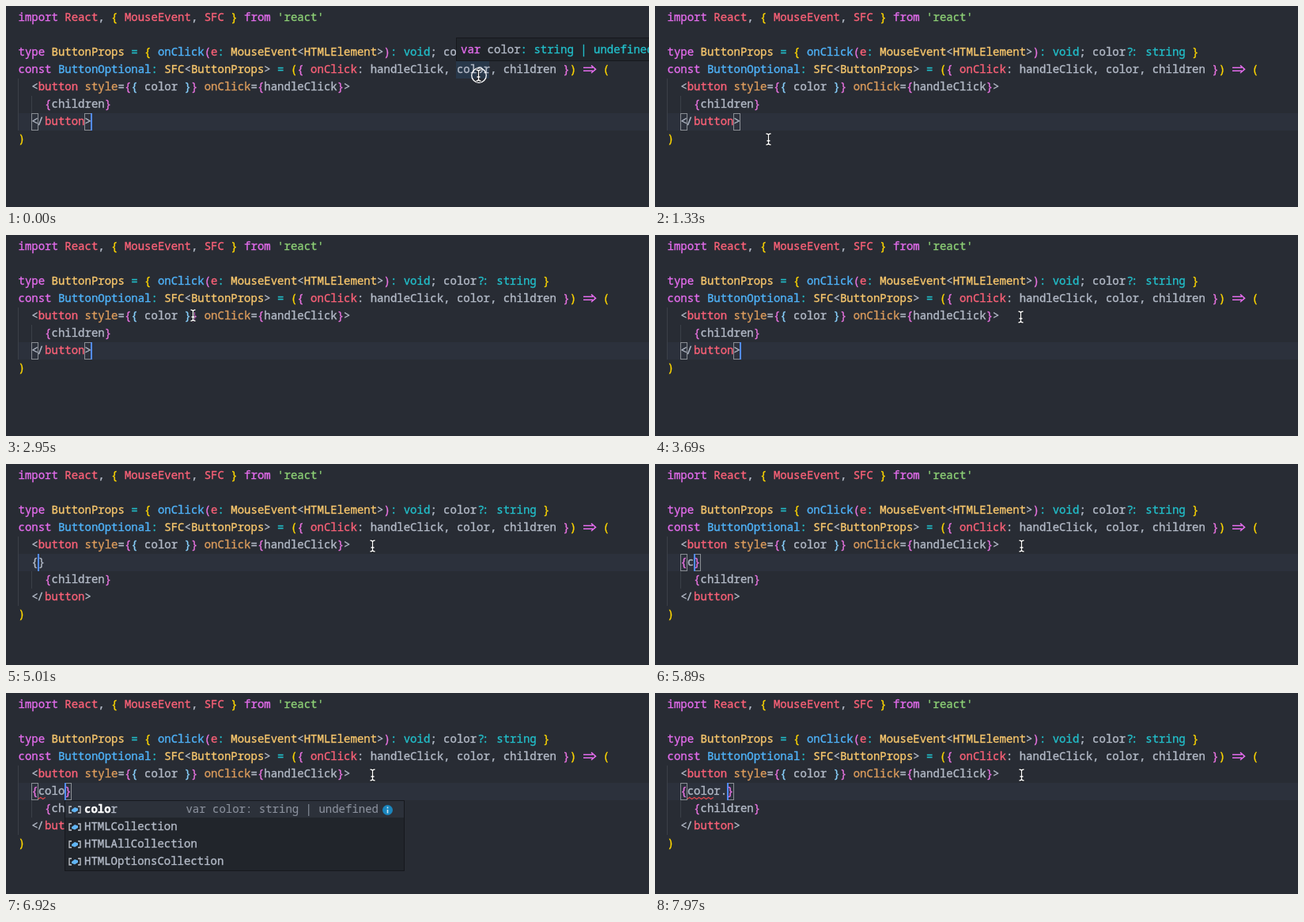
An HTML page for the animation above (8000 ms loop, 813 by 255 pixels).

```html
<!DOCTYPE html>
<html lang="en">
<head>
<meta charset="utf-8">
<title>Typing in a code editor</title>
<style>
  html, body { margin: 0; width: 100%; height: 100%; overflow: hidden; background: #282c34; }
  svg { display: block; width: 813px; height: 255px; }
  text { font: 14px "Noto Sans Mono", "DejaVu Sans Mono", monospace; white-space: pre; font-variant-ligatures: none; }
  tspan { fill: currentColor; stroke: currentColor; stroke-width: .35px; }
  .f { color: #b4bbc8 }
  .p { color: #e36cec }
  .r { color: #fa6177 }
  .y { color: #f8c76c }
  .b { color: #4fb3fa }
  .c { color: #22bfca }
  .n { color: #8ccf75 }
  .o { color: #dc9c5c }
  .g { color: #ffd700 }
  .m { color: #e873e0 }
  .s { color: #87cefa }
  .w { color: #fff; font-weight: 700 }
  .d { color: #8b919d; stroke-width: .1px }
  .guide { fill: #3b4048 }
  .match { fill: none; stroke: #8a8e94 }
  .panel { fill: #21252b; stroke: #16181d }
  .line { fill: none; stroke-width: 1.3 }
</style>
</head>
<body>
<svg id="stage" viewBox="0 0 813 255"></svg>
<script>
const LOOP = 8000, CELL = 8.4, LEFT = 15.5, ROW = 22;
const stage = document.getElementById('stage');
const colX = col => LEFT + col * CELL;
const rowTop = row => 4 + row * ROW;

// "~k" switches to colour class k; an arrow after it nudges a ligature part.
const nudges = { '›': 1.5, '‹': -1.5 };
const escapeText = s => s.replace(/&/g, '&amp;').replace(/</g, '&lt;');

function text(x, y, markup) {
  let col = 0, spans = '';
  for (const token of markup.split('~').slice(1)) {
    const nudge = nudges[token[1]] || 0;
    const body = token.slice(nudge ? 2 : 1);
    spans += `<tspan class="${token[0]}" x="${(x + col * CELL + nudge).toFixed(2)}">${escapeText(body)}</tspan>`;
    col += body.length;
  }
  return `<text y="${y}">${spans}</text>`;
}
const codeLine = (row, col, markup) => text(colX(col), rowTop(row) + 15, markup);
const rect = (cls, x, y, w, h) => `<rect class="${cls}" x="${x}" y="${y}" width="${w}" height="${h}"/>`;
const fillRect = (fill, x, y, w, h) => `<rect fill="${fill}" x="${x}" y="${y}" width="${w}" height="${h}"/>`;
const path = (d, stroke, extra = '') => `<path class="line" d="${d}" stroke="${stroke}" ${extra}/>`;
const match = (row, col) => rect('match', Math.floor(colX(col)) + .5, rowTop(row) + .5, 8, 21);

const head = [
  [0, 0, "~pimport ~rReact~f, ~g{ ~rMouseEvent~f, ~rSFC ~g} ~pfrom ~n'react'"],
  [2, 0, '~ptype ~yButtonProps ~c= ~g{ ~bonClick~m(~re~c: ~yMouseEvent~f<~yHTMLElement~f>~m)~c: void~f; color~c›?~c‹: ~cstring ~g}'],
  [3, 0, '~pconst ~bButtonOptional~c: ~ySFC~f<~yButtonProps~f> ~c= ~g(~m{ ~ronClick~f: handleClick, color, children ~m}~g)~p    ~g('],
  [4, 2, '~f<~rbutton ~ostyle~f=~m{~s{ ~fcolor ~s}~m} ~oonClick~f=~m{~fhandleClick~m}~f>']
];
const tail = [
  [5, 4, '~m{~fchildren~m}'],
  [6, 2, '~f<~f‹/~rbutton~f>'],
  [7, 0, '~g)']
];
const arrow = path('M730 78.2H742M730 82.2H742M740 75.4L745.5 80.2L740 85', '#e36cec', 'style="stroke-width:1.6"');
const code = lines => lines.map(l => codeLine(...l)).join('');

// Timelines: each entry holds until the next one.
const mouseSteps = [
  [0, 597, 88], [1190, 400, 128], [1330, 143, 169], [1470, 150, 160], [1620, 172, 134],
  [1770, 188, 114], [1910, 194, 106], [2950, 236, 102], [3090, 335, 100], [3240, 430, 102],
  [3390, 460, 104], [3690, 462, 104], [3990, 463, 104]
];
const caretSteps = [
  [0, 1], [290, 0], [740, 1], [1190, 0], [1770, 1], [2210, 0], [2800, 1], [3240, 0],
  [3690, 1], [4430, 0], [4720, 1], [5450, 0], [5890, 1]
];
const typingSteps = [
  [0, ''], [5890, 'c'], [6630, 'co'], [6770, 'col'], [6920, 'colo'], [7520, 'color'], [7670, 'color.']
];
const at = (steps, t) => steps.filter(s => s[0] <= t).pop();
const CLICK = 3990, ENTER = 4720, BRACES = 5010, MATCHED = 5160;

// Suggestions: w = snippet, v = variable, m = method.
const suggestions = {
  c: 'w caption,w code,w col,w colg,w command,v color',
  co: 'w col,w colg,w command,v color,m confirm,v console',
  col: 'w col,w colg,v color,v HTMLCollection,v HTMLTableColElement,v HTMLAllCollection',
  colo: 'v color,v HTMLCollection,v HTMLAllCollection,v HTMLOptionsCollection'
};
const icons = {
  w: path('M1.5 5L8 -1', '#c5c8ce', 'style="stroke-width:3" stroke-linecap="round"') +
     path('M12.5 -5.2A3.4 3.4 0 1 0 14.2 -1.6L10.6 -1.4L10.3 -3.4Z', '#c5c8ce', 'style="stroke-width:1.6"'),
  v: path('M4 -4H1V4H4M12 -4H15V4H12', '#c5c8ce') +
     '<path d="M4 0L8 -3L12 -1.5V1L8 3.5L4 2Z" fill="#62b5f5"/>',
  m: path('M8 -6.5L14 -3.5V3.5L8 6.5L2 3.5V-3.5ZM2 -3.5L8 -.5L14 -3.5M8 -.5V6.5', '#b887dd')
};

function popup(query, x, detailed) {
  const top = rowTop(6);
  const rows = suggestions[query].split(',').map(s => s.split(' '));
  let out = rect('panel', x + .5, top + .5, 429, rows.length * ROW + 1) +
            fillRect('#2c313a', x + 1, top + 1, 428, ROW - 1);
  if (rows.length > 5) out += fillRect('#484d57', x + 420, top + 1, 10, ROW - 1);
  rows.forEach(([kind, name], i) => {
    const y = top + i * ROW, n = name.startsWith(query) ? query.length : 0;
    out += `<g transform="translate(${x + 5} ${y + 12})">${icons[kind]}</g>` +
           text(x + 25, y + 16, (n ? '~w' + name.slice(0, n) : '') + '~f' + name.slice(n));
  });
  if (detailed) {
    const note = rows[0][0] === 'w' ? 'Emmet Abbreviation' : 'var color: string | undefined';
    out += text(x + 397 - note.length * CELL, top + 16, '~d' + note) +
           `<circle cx="${x + 408.5}" cy="${top + 12.5}" r="6.5" fill="#1a85bd"/>` +
           path(`M${x + 408.5} ${top + 8.5}v2m0 1.4v4.6`, '#cfe3ee', 'style="stroke-width:1.6"');
  }
  return out;
}

const tooltip = (x, y, chars, markup, opacity = 1) =>
  `<g opacity="${opacity}">${rect('panel', x + .5, y + .5, chars * CELL + 11, 29)}${text(x + 6, y + 20, markup)}</g>`;

function squiggle(chars) {
  let d = `M${colX(3)} 134.5`;
  for (let i = 0; i < Math.round(chars * CELL / 3); i++) d += i % 2 ? 'l3 2' : 'l3 -2';
  return path(d, '#e5484d', 'style="stroke-width:1.1"');
}

function mouse(x, y, pressed) {
  const d = `M${x - 3} ${y - 7}Q${x} ${y - 7} ${x} ${y - 5}Q${x} ${y - 7} ${x + 3} ${y - 7}` +
            `M${x} ${y - 5}V${y + 5}M${x - 3} ${y + 7}Q${x} ${y + 7} ${x} ${y + 5}Q${x} ${y + 7} ${x + 3} ${y + 7}M${x - 2} ${y + 2}h4`;
  const ring = pressed ? `<circle class="line" cx="${x + .5}" cy="${y}" r="9.3" stroke="#fff"/>` : '';
  return ring + path(d, '#15171b', 'style="stroke-width:3"') + path(d, '#fff');
}

function scene(t) {
  const entered = t >= ENTER, clicked = t >= CLICK;
  const typed = at(typingSteps, t)[1];
  const firstHover = t < 1190, secondHover = t >= 2210 && t < 2950;
  const caretRow = entered ? 5 : clicked ? 4 : 6;
  const caretCol = t >= BRACES ? 3 + typed.length : entered ? 2 : clicked ? 50 : 11;
  const caretX = Math.floor(colX(caretCol));

  let out = fillRect('#2c313c', 15, rowTop(caretRow), 798, ROW);
  if (firstHover) out += fillRect('#28384a', 569, 70, 42, ROW);
  if (secondHover) out += fillRect('#28384a', 175, 92, 42, ROW);

  const shift = entered ? ROW : 0;
  out += rect('guide', 15, 92, 1, 66 + shift) + rect('guide', 32, 114 + shift, 1, ROW);
  out += code(head) + arrow + `<g transform="translate(0 ${shift})">${code(tail)}</g>`;

  if (!clicked) out += match(6, 2) + match(6, 10);
  else if (!entered) out += match(4, 2) + match(4, 49);

  if (t >= BRACES) {
    const k = t >= MATCHED ? 'm' : 'f';
    out += codeLine(5, 2, `~${k}{~f${typed}~${k}}`);
    if (k === 'm') out += match(5, 2) + match(5, caretCol);
  }
  if (t >= 6330) out += squiggle(t < 7370 ? 1 : 4);
  if (at(caretSteps, t)[1]) out += fillRect('#528bff', caretX, rowTop(caretRow), 2, ROW);
  if (t >= 6040 && suggestions[typed]) out += popup(typed, caretX, t >= 6190);

  if (t >= 7370 && t < 7970) {
    out += '<path d="M24 103V101A4.6 4.6 0 1 1 28 101V103Z" fill="#ffcc00"/>' +
           path('M24 104.5H28M24.5 106.5H27.5', '#c5c8ce');
  }
  if (firstHover) out += tooltip(569, 40, 29, '~pvar ~fcolor~c: string | undefined');
  if (secondHover) out += tooltip(175, 62, 36, '~f(property) color: string ~c| ~oundefined', t < 2360 ? .8 : 1);

  const [, x, y] = at(mouseSteps, t);
  return out + mouse(x + .5, y, t < 150 || (t >= 3840 && t < 4130));
}

let shown = '';
function tick() {
  const next = scene(performance.now() % LOOP);
  if (next !== shown) stage.innerHTML = shown = next;
  requestAnimationFrame(tick);
}
tick();
</script>
</body>
</html>
```
